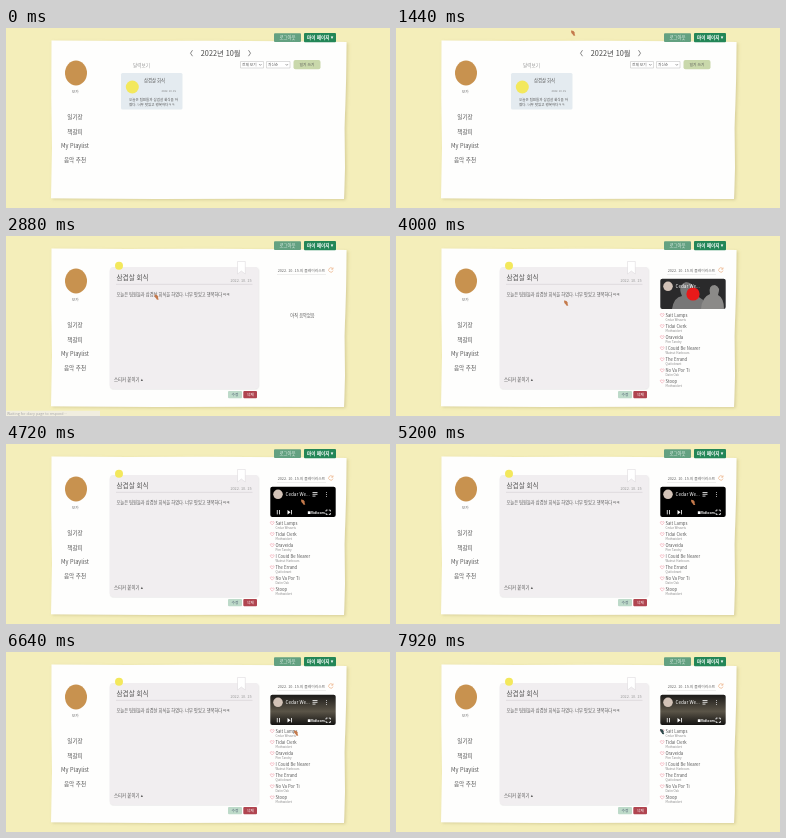
Animation, 384 px wide and 180 px high, one loop 8000 ms. Source, as an HTML page:

```html
<!DOCTYPE html>
<html lang="ko">
<head>
<meta charset="utf-8">
<title>Diary</title>
<style>
html, body { margin: 0; width: 100%; height: 100%; overflow: hidden; background: #f4eeba; }
svg { display: block; width: 100vw; height: 100vh; }
text { font-family: "Noto Sans CJK KR", "Noto Sans CJK", "Noto Sans", sans-serif; font-weight: 300; white-space: pre; }
</style>
</head>
<body>
<svg id="stage" viewBox="0 0 384 180">
  <defs>
    <linearGradient id="scene" x2="0" y2="1">
      <stop stop-color="#1b1a18"/><stop offset=".55" stop-color="#5b5548"/><stop offset="1" stop-color="#141312"/>
    </linearGradient>
    <filter id="shadow" x="-10%" y="-10%" width="120%" height="120%">
      <feDropShadow dx="1.5" dy="1" stdDeviation="1.8" flood-color="#a0935c" flood-opacity=".35"/>
    </filter>
    <filter id="soft" x="-10%" y="-10%" width="120%" height="120%">
      <feDropShadow dx=".3" dy=".4" stdDeviation=".7" flood-color="#777" flood-opacity=".25"/>
    </filter>
  </defs>
  <rect width="384" height="180" fill="#f4eeba"/>
  <path filter="url(#shadow)" fill="#fefefd" d="M45.5 12.5 L120 13 200 12.7 280 13.2 340.5 14 340 55 338.5 100 339 140 338 171 240 170.7 150 171 45 170.3 46 120 45.3 70Z"/>
  <g id="frame">
    <rect x="268" y="5.3" width="27" height="8.8" rx="1" fill="#63a181"/>
    <rect x="298" y="5" width="32" height="9.2" rx="1" fill="#238657"/>
    <ellipse cx="70" cy="45" rx="11" ry="12.5" fill="#c8924f"/>
  </g>
  <g id="list">
    <path d="M186.5 22.2 L184.5 25.2 186.5 28.2 M242.5 22.2 L244.5 25.2 242.5 28.2" fill="none" stroke="#555" stroke-width=".7"/>
    <path d="M234.5 33.5h23v6.5h-23z M260.5 33.5h23.5v6.5h-23.5z" fill="#fff" stroke="#bbb" stroke-width=".5"/>
    <path d="M253 36 l1.3 1.4 1.3-1.4 M279.5 36 l1.3 1.4 1.3-1.4" fill="none" stroke="#555" stroke-width=".5"/>
    <rect x="287.5" y="32" width="27" height="9.2" rx="2" fill="#c9d8ab"/>
    <rect x="115" y="45" width="61.5" height="36.5" rx="1.5" fill="#e4ebf0"/>
    <circle cx="126.3" cy="59" r="6.5" fill="#f3e85c"/>
  </g>
  <g id="detail">
    <rect x="103.7" y="31" width="149" height="122" rx="4" fill="#f1eef0" filter="url(#soft)"/>
    <circle cx="113" cy="29.8" r="4" fill="#f3e85c"/>
    <path d="M231.5 25.5h7.8v12.5l-3.9-3-3.9 3z" fill="#fff" stroke="#d8d5d8" stroke-width=".5"/>
    <path d="M110 48.3H246.5" stroke="#c9c5c9" stroke-width=".5"/>
    <path d="M271 38.5H320" stroke="#d5d5d5" stroke-width=".4"/>
    <rect x="222" y="155" width="14" height="7.2" rx="1" fill="#bddac9"/>
    <rect x="237.3" y="155" width="13.7" height="7.2" rx="1" fill="#b04550"/>
    <path d="M326.6 32.6a2.2 2.2 0 1 0 .4 2M327 31.4v1.8h-1.8" fill="none" stroke="#e9a473" stroke-width=".6"/>
  </g>
  <g id="empty"></g>
  <g id="songs"></g>
  <g id="video">
    <rect x="264.3" y="42.7" width="65.4" height="30.3" rx="2" id="screen"/>
    <g id="cover">
      <path d="M276 73q2-12 10-13q-5-11 4-14q10 1 7 13q12 2 14 14z" fill="#777"/>
      <path d="M305 73q1-12 9-15q-2-9 5-9q6 2 3 10q6 3 6 14z" fill="#8b8a88"/>
      <circle cx="297" cy="58" r="6.6" fill="#e81a1a"/>
    </g>
    <circle cx="272" cy="50.3" r="4.8" fill="#d3c3b8"/>
    <g id="controls" stroke="#fff" stroke-width=".8" fill="none">
      <path d="M306.5 48.5h5M306.5 50.3h5M306.5 52.1h3"/>
      <path d="M320.5 48v.8M320.5 50v.8M320.5 52v.8"/>
      <path d="M271.3 66v4.4M273.5 66v4.4M285.5 66v4.4"/>
      <path d="M281.5 66l3 2.2-3 2.2z" fill="#fff" stroke="none"/>
      <path d="M320 67.5v-1.4h1.6M322.8 66.1h1.6v1.4M320 69v1.4h1.6M322.8 70.4h1.6V69"/>
    </g>
  </g>
  <g id="status"><rect y="174.8" width="94" height="5.2" fill="#f1eee0"/></g>
  <path id="cursor" d="M-2-2.6Q.8-2.8 1.7-.6Q1.2 .7 2.3 2.6Q.2 3.2-.4 1.2Q-2.2 .2-2-2.6z"/>
</svg>
<script>
const $ = id => document.getElementById(id);
const add = (parent, tag, attrs) => {
  const el = document.createElementNS('http://www.w3.org/2000/svg', tag);
  for (const key in attrs) el.setAttribute(key, attrs[key]);
  return $(parent).appendChild(el);
};
// x is the anchor position, y the middle of the line
const label = (parent, str, x, y, size, fill = '#555', anchor = 'start', weight = 300) => {
  add(parent, 'text', { x, y: y + size * .36, 'font-size': size, fill, stroke: 'none', 'text-anchor': anchor,
    style: `font-weight:${weight}` }).textContent = str;
};
const mid = (parent, str, x, y, size, fill, weight) => label(parent, str, x, y, size, fill, 'middle', weight);

mid('frame', '로그아웃', 281.5, 9.7, 4.3, '#e6f2ea');
mid('frame', '마이 페이지 ▾', 314, 9.6, 4.6, '#fff', 700);
mid('frame', '모카', 69.3, 64, 3.8, '#777');
['일기장', '책갈피', 'My Playlist', '음악 추천'].forEach((name, i) =>
  mid('frame', name, 69, 89.3 + i * 14.3, 5.6, '#555'));

mid('list', '2022년 10월', 214.7, 25, 7.3, '#444');
label('list', '달력보기', 127, 37.2, 4.6, '#999');
label('list', '전체 보기', 236, 36.7, 3.7);
label('list', '최신순', 262, 36.7, 3.7);
mid('list', '일기 쓰기', 301, 36.6, 3.8);
label('list', '삼겹살 회식', 138, 52, 4.3);
label('list', '2022. 10. 15', 170, 62.7, 2.6, '#777', 'end');
label('list', '오늘은 팀원들과 삼겹살 회식을 하', 123, 71.8, 3.5);
label('list', '였다. 너무 맛있고 행복하다ㅋㅋ', 123, 77, 3.5);

label('detail', '삼겹살 회식', 110.5, 41.8, 6.6);
label('detail', '2022. 10. 15', 245.5, 44.7, 3.8, '#999', 'end');
label('detail', '오늘은 팀원들과 삼겹살 회식을 하였다. 너무 맛있고 행복하다ㅋㅋ', 110.5, 58.3, 4.2);
label('detail', '스티커 붙이기 ▴', 108, 143, 4.4);
mid('detail', '수정', 229, 158.6, 3.8, '#567');
mid('detail', '삭제', 244.2, 158.6, 3.8, '#fff');
mid('detail', '2022. 10. 15.의 플레이리스트', 295.5, 34.3, 3.8, '#666');
mid('empty', '아직 음악없음', 296.5, 79.3, 4.2);
label('status', 'Waiting for diary page to respond…', 1, 177.4, 3.6, '#aaa');

[
  ['Salt Lamps', 'Cedar Weasels'], ['Tidal Clerk', 'Mothwicket'], ['Oravelda', 'Pim Tandry'],
  ['I Could Be Nearer', 'Walnut Harbours'], ['The Errand', 'Quillobrant'],
  ['No Va Por Ti', 'Dalin Osk'], ['Stoop', 'Mothwicket']
].forEach(([title, artist], i) => {
  const y = 79.2 + i * 11.05;
  add('songs', 'path', { d: `M266.2 ${y + 1.7}l-1.7-1.8c-.8-1.5 1.1-2.2 1.7-.8 .6-1.4 2.5-.7 1.7.8z`,
    fill: 'none', stroke: '#ee8f9e', 'stroke-width': .5 });
  label('songs', title, 269.5, y, 4.2);
  label('songs', artist, 269.5, y + 4.9, 3, '#888');
});
label('video', 'Cedar We...', 279.5, 50.3, 4.6, '#fff', 'start', 500);
label('controls', '■Vidloom', 301.5, 68.3, 3.4, '#fff', 'start', 700);

// time, x, y
const path = [
  [1440, 177, 5], [2240, 150, 61], [3600, 151, 61], [4000, 170, 67], [4640, 297, 58],
  [5520, 297, 58.5], [6400, 295, 74], [6640, 290, 81], [7280, 267, 80], [7920, 266, 79.5]
];
function cursorAt(t) {
  const i = path.findIndex(p => p[0] > t);
  if (i < 0) return path.at(-1).slice(1);
  if (!i) return path[0].slice(1);
  const [t0, x0, y0] = path[i - 1], [t1, x1, y1] = path[i];
  const u = (t - t0) / (t1 - t0), e = u * u * (3 - 2 * u);
  return [x0 + (x1 - x0) * e, y0 + (y1 - y0) * e];
}
const show = (id, on) => $(id).style.display = on ? '' : 'none';

function draw(now) {
  const t = Math.floor(now % 8000 / 80) * 80;
  show('list', t < 2320);
  show('detail', t >= 2320);
  show('empty', t >= 2320 && t < 3360);
  show('status', t >= 2320 && t < 3040);
  show('songs', t >= 3360);
  show('video', t >= 3680);
  show('cover', t < 4720);
  show('controls', t >= 4720);
  $('screen').setAttribute('fill', t < 4720 ? '#2a2a2b' : t < 5600 ? '#000' : 'url(#scene)');
  show('cursor', t >= 1440);
  const [x, y] = cursorAt(t);
  $('cursor').setAttribute('transform', `translate(${x} ${y})`);
  $('cursor').setAttribute('fill', t >= 7360 ? '#2d4a4c' : '#c47a4c');
  requestAnimationFrame(draw);
}
draw(performance.now());
</script>
</body>
</html>
```
